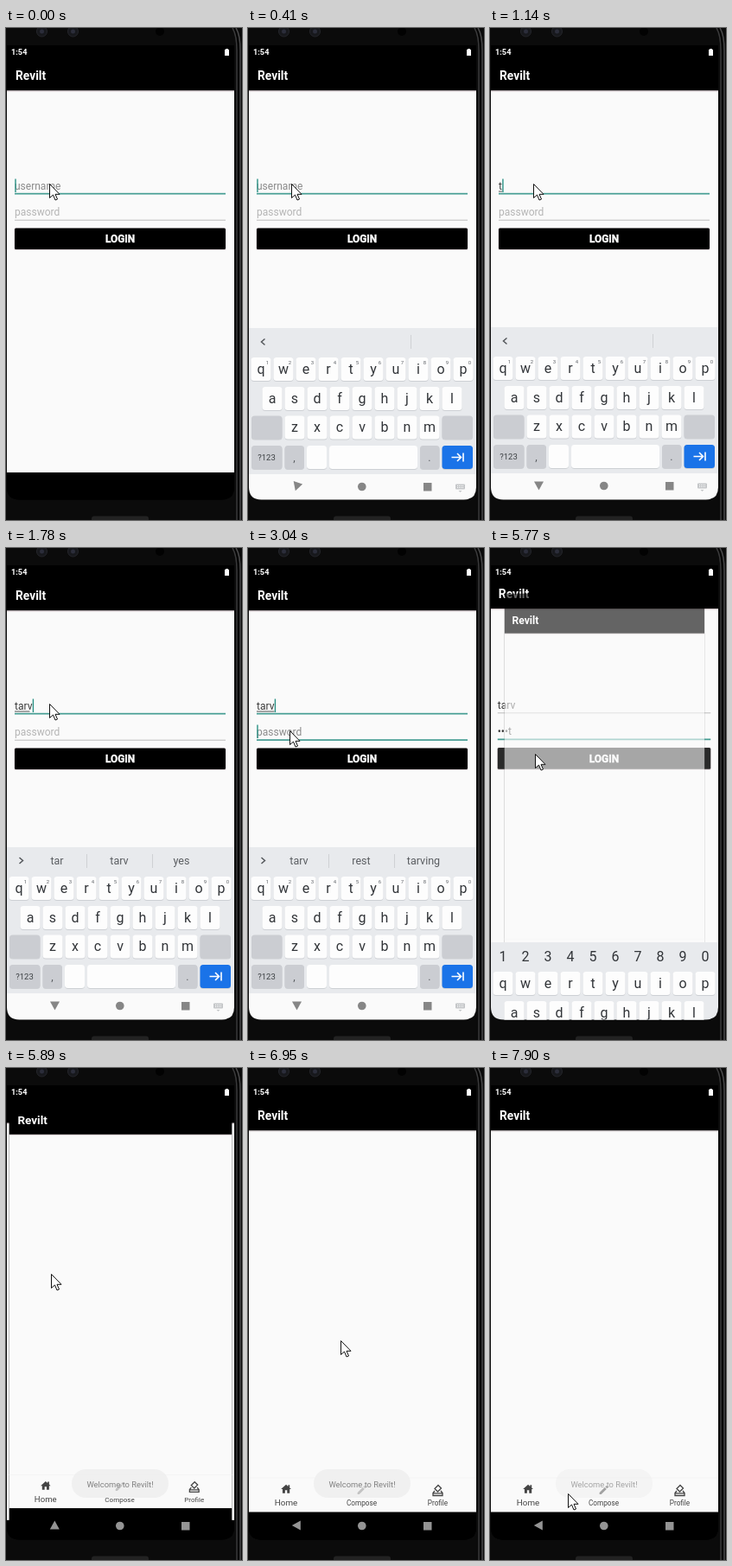
These frames come from a looping animation (273 by 569 pixels, 8 s). An HTML page:

```html
<!DOCTYPE html>
<html lang="en">
<head>
<meta charset="utf-8">
<title>Login demo</title>
<style>
html, body { margin: 0; width: 100%; height: 100%; overflow: hidden; background: #0b0b0b; }
svg { display: block; width: 273px; height: 569px; font-family: Roboto, Arial, sans-serif; }
.mid { text-anchor: middle; }
.bold { font-weight: 700; fill: #fff; }
.field { font-size: 12px; }
.key { font-size: 16px; fill: #323539; }
.small { font-size: 6px; fill: #5f6368; }
.word { font-size: 12.5px; fill: #5a5d61; }
</style>
</head>
<body>
<svg viewBox="0 0 273 569">
  <defs>
    <clipPath id="screen"><path d="M1 20H264V531Q264 545.500 249.500 545.500H15.500Q1 545.500 1 531Z"/></clipPath>
    <g id="softkeys">
      <circle cx="131.800" cy="529.500" r="4.800"/>
      <rect x="203" y="525" width="9.500" height="9.500"/>
    </g>
    <path id="back" d="M-5.500 0L4.500 -5.500V5.500Z"/>
  </defs>

  <!-- phone body -->
  <rect width="273" height="569" fill="#0b0b0b"/>
  <g fill="none">
    <path d="M262 0Q267 8 267 26V569" stroke="#3a3a3b" stroke-width="1.500"/>
    <path d="M264.500 0Q269 8 269 26V569" stroke="#050505" stroke-width="2"/>
    <path d="M266 0Q271 8 271 26V569" stroke="#4a4a4b" stroke-width="1.500"/>
  </g>
  <g fill="#17181c" stroke="#25262b">
    <circle cx="41.500" cy="4" r="6"/><circle cx="77.500" cy="4" r="6"/>
  </g>
  <g fill="#2b2d3a"><circle cx="41.500" cy="4" r="2.500"/><circle cx="77.500" cy="4" r="2.500"/></g>
  <circle cx="178" cy="4" r="5" fill="#020202"/>
  <rect x="99" y="564.500" width="66" height="8" rx="3" fill="#222"/>

  <g clip-path="url(#screen)">
    <rect x="1" y="20" width="263" height="526"/>
    <g id="login">
      <rect x="1" y="20" width="263" height="526"/>
      <rect x="1" y="72.500" width="263" height="441.500" fill="#fafafa"/>
      <rect x="1" y="72.500" width="263" height="1" fill="#d8cacf"/>
      <text class="bold" x="11" y="60" font-size="13.800">Revilt</text>
      <rect id="userLine" x="10" width="244"/>
      <rect id="passLine" x="10" width="244"/>
      <text id="user" class="field" x="10" y="187"></text>
      <rect id="spell" x="10" y="188.500" height="1" fill="#555"/>
      <text id="pass" class="field" x="10" y="217"></text>
      <rect id="userCaret" y="174.500" width="1.400" height="15.500" fill="#2a9184"/>
      <rect id="passCaret" y="204.500" width="1.400" height="15.500" fill="#2a9184"/>
      <rect x="9.500" y="231" width="245" height="26" rx="1.500" fill="#e3dade"/>
      <rect id="button" x="10" y="231.500" width="244" height="24.500" rx="1.500"/>
      <text class="bold mid" x="132" y="248" font-size="11.900" stroke="#fff" stroke-width=".35">LOGIN</text>
    </g>

    <g id="home">
      <rect x="1" y="20" width="263" height="526"/>
      <rect x="1" y="72.500" width="263" height="441" fill="#fafafa"/>
      <rect x="1" y="72.500" width="263" height="1" fill="#d8cfd2"/>
      <rect x="1" y="473.500" width="263" height="1" fill="#f5f5f5"/>
      <text class="bold" x="11" y="60" font-size="13.800">Revilt</text>
      <g fill="#444" class="mid">
        <path transform="translate(37 480) scale(.59)" d="M19 9.300V4h-3v2.600L12 3 2 12h3v8h5v-6h4v6h5v-8h3z"/>
        <path transform="translate(125 481.500) scale(.55)" fill="#555" d="M3 17.250V21h3.750L17.800 9.900l-3.750-3.750zM20.700 7a1 1 0 0 0 0-1.400l-2.300-2.300a1 1 0 0 0-1.400 0l-1.900 1.800 3.750 3.750z"/>
        <g fill="none" stroke="#444" stroke-width="1.300">
          <path d="M220 482.500L223.500 486L219.500 490L216 486.500Z"/>
          <path d="M216 489L214 491.500V494.500H225V491.500L223 489M214 491.800H225"/>
        </g>
        <text x="44" y="506" font-size="9.800">Home</text>
        <text x="131.500" y="506" font-size="8.200">Compose</text>
        <text x="219.500" y="506" font-size="8.200">Profile</text>
      </g>
    </g>
    <g id="homeNav" fill="#949494">
      <use href="#softkeys"/>
      <use id="homeBack" href="#back"/>
    </g>

    <g id="board">
      <rect x="1" y="346" width="263" height="170" fill="#e8eaed"/>
      <rect x="1" y="515" width="263" height="31" fill="#fafafa"/>
      <path id="chevron" fill="none" stroke="#55585c" stroke-width="1.500"/>
      <g id="words"></g>
      <g id="digits"></g>
      <g id="keys"></g>
      <g id="plain"></g>
      <g id="secret"></g>
      <g fill="#868686">
        <use href="#softkeys"/>
        <use id="boardBack" href="#back"/>
      </g>
      <rect x="240" y="526.500" width="11" height="6" rx="1" fill="#c5c7c9"/>
      <path d="M242 528.500H249.500M242 530.500H249.500" stroke="#fff" stroke-dasharray="1 1"/>
      <path d="M243.500 534H247.500L245.500 536Z" fill="#c5c7c9"/>
    </g>

    <g id="toast">
      <rect x="76" y="464" width="112" height="33" rx="16" fill="#eee" fill-opacity=".72"/>
      <text class="mid" x="132" y="484.800" font-size="9.400" fill="#808080">Welcome to Revilt!</text>
    </g>

    <text class="bold" x="6" y="31.300" font-size="9.200">1:54</text>
    <path d="M254 24H257V25H258V32H253V25H254Z" fill="#fff"/>
  </g>

  <path id="mouse" d="M0 0V16L4 12.500L6.500 18.500L9 17.500L6.500 11.800H11.500Z" fill="#fff" stroke="#111" stroke-linejoin="round"/>
</svg>
<script>
const LOOP = 8000, STEP = 134;
const $ = id => document.getElementById(id);
const TEAL = '#459d93';

// Pointer moves: start time, number of steps, end point.
const moves = [[2470, 1, 49, 180], [2760, 2, 48, 211], [4680, 4, 52, 238],
  [6030, 3, 108, 307], [6950, 8, 90, 492]];

// Each track is a list of [start time, ...values]; a value holds until the next one.
const slide = [[0, 200], [140, 120], [270, 24], [410, 1], [560, 0], [5760, 110], [5890, 200]];
const boardTurn = [[0, 0], [270, -40], [410, -72], [560, -90]];
const homeTurn = [[0, 90], [6030, 45], [6170, 12], [6320, 0]];
const userText = [[0, ''], [1140, 't'], [1300, 'ta'], [1620, 'tar'], [1780, 'tarv']];
const passText = [[0, ''], [3760, 't'], [4030, '•e'], [4280, '••s'], [4560, '•••t']];
const userBlink = [[0, 1], [690, 0], [1140, 1], [2340, 0], [2760, 1], [3190, 0]];
const passBlink = [[0, 0], [3040, 1], [3610, 0], [3760, 1], [5080, 0]];
const hints = [[0], [1300, 'to', 'the', 'that'], [1460, 'ta', 'take', 'talk'],
  [1780, 'tar', 'tarv', 'yes'], [2060, 'tarv', 'rest', 'tarving']];
const homeZoom = [[0, 0, 0], [5760, .88, .6], [5890, .98, 1], [6030, .996, 1], [6170, 1, 1]];
const loginZoom = [[0, 1], [5760, 1.01], [5890, 1.04]];
const toastAlpha = [[0, 0], [5890, 1], [7900, .7]];

function at(track, t) {
  let now = track[0];
  for (const step of track) if (step[0] <= t) now = step;
  return now.slice(1);
}

function pointer(t) {
  let x = 50, y = 180;
  for (const [start, steps, toX, toY] of moves) {
    if (t < start) break;
    const p = Math.min(1, (Math.floor((t - start) / STEP) + 1) / steps);
    const ease = p * p * (3 - 2 * p);
    x += (toX - x) * ease;
    y += (toY - y) * ease;
  }
  return [Math.round(x) + .5, Math.round(y) + .5];
}

const set = (id, attrs) => { for (const k in attrs) $(id).setAttribute(k, attrs[k]); };
const show = (id, on) => { $(id).style.display = on ? '' : 'none'; };
const label = (x, y, s, cls) => `<text class="mid ${cls}" x="${x}" y="${y}">${s}</text>`;
const cap = (x, y, w, fill) =>
  `<rect x="${x}" y="${y + 1}" width="${w}" height="27" rx="3.500" fill="#cdd0d4"/>` +
  `<rect x="${x}" y="${y}" width="${w}" height="27" rx="3.500" fill="${fill}"/>`;
const icon = d => `<path d="${d}" fill="none" stroke="#44474b" stroke-width="1.400" stroke-linejoin="round"/>`;

function buildBoard() {
  const GREY = '#cbcdd2', BLUE = '#1a73e8', WHITE = '#fdfdfd', digits = '1234567890';
  let keys = '';
  [['qwertyuiop', 15, 380], ['asdfghjkl', 28, 414], ['zxcvbnm', 54, 447.5]].forEach(([row, x0, y]) => {
    [...row].forEach((c, i) => {
      const x = x0 + 26 * i;
      keys += cap(x - 11.5, y, 23, WHITE) + label(x, y + 18.5, c, 'key');
    });
  });
  keys += cap(4, 447.5, 35.5, GREY) + cap(224.5, 447.5, 35.5, GREY);
  keys += cap(4, 482, 35.5, GREY) + '<text class="mid" x="21.500" y="499" font-size="9.500" fill="#3c4043">?123</text>';
  keys += cap(42.5, 482, 22.5, GREY) + label(53.5, 500, ',', 'word');
  keys += cap(199, 482, 22.5, GREY) + label(210, 500, '.', 'word');
  keys += cap(224.5, 482, 35.5, BLUE);
  $('keys').innerHTML = keys;

  $('plain').innerHTML =
    [...digits].map((d, i) => label(22.5 + 26 * i, 388, d, 'small')).join('') +
    cap(68, 482, 23, WHITE) + cap(94, 482, 102, WHITE) +
    '<path d="M235.500 495.500H246M242 491L246.500 495.500L242 500M249 490.500V500.500" fill="none" stroke="#fff" stroke-width="1.600"/>';

  $('secret').innerHTML =
    cap(68, 482, 128, WHITE) +
    icon('M21.500 455L28 462H24.500V467.500H18.500V462H15Z') +
    icon('M239 456H249V467H239L234 461.500ZM240.500 459L245.500 464M245.500 459L240.500 464') +
    '<path d="M236.500 495.500L240.500 499.500L248 491.500" fill="none" stroke="#fff" stroke-width="1.800"/>';

  $('digits').innerHTML = [...digits].map((d, i) => label(15 + 26 * i, 367.5, d, 'key')).join('');
}

function drawWords(t) {
  const words = at(hints, t);
  const bars = words.length ? [93.5, 169.5] : [188.5];
  $('words').innerHTML = words.map((w, i) => label(59 + 72 * i, 366, w, 'word')).join('') +
    bars.map(x => `<rect x="${x - .5}" y="354" width="1" height="16" fill="#cfd1d4"/>`).join('');
  set('chevron', { d: words.length ? 'M15.500 358L19.500 361.500L15.500 365' : 'M19.500 358.500L15.500 362L19.500 365.500' });
}

function drawField(id, text, hint, focused, caret) {
  $(id).textContent = text || hint;
  set(id, { fill: text ? '#3a3a3a' : focused ? '#8a8a8a' : '#b4b4b4' });
  const width = text ? $(id).getComputedTextLength() : 0;
  set(id + 'Caret', { x: 10.3 + width });
  show(id + 'Caret', caret);
  return width;
}

function drawLine(id, y, focused) {
  set(id, { y: focused ? y : y + .5, height: focused ? 1.7 : 1, fill: focused ? TEAL : '#bdbdbd' });
}

const zoom = s => `translate(132 292) scale(${s}) translate(-132 -292)`;

function draw(t) {
  const inUser = t < 3190, inPass = t >= 3040;
  const width = drawField('user', at(userText, t)[0], 'username', inUser, at(userBlink, t)[0]);
  drawField('pass', at(passText, t)[0], 'password', inPass, at(passBlink, t)[0]);
  drawLine('userLine', 190.8, inUser);
  drawLine('passLine', 221.2, inPass);
  show('spell', inUser);
  set('spell', { width: t >= 1780 && t < 2060 ? width - 3 : width });
  set('button', { fill: t >= 5480 ? '#2a2a2a' : '#000' });
  set('login', { transform: zoom(at(loginZoom, t)[0]) });

  const secret = t >= 3190;
  show('board', t >= 140 && t < 5890);
  set('board', { transform: `translate(0 ${at(slide, t)[0]})` });
  set('boardBack', { transform: `translate(56.500 529) rotate(${at(boardTurn, t)[0]})` });
  ['secret', 'digits'].forEach(id => show(id, secret));
  ['plain', 'words', 'chevron'].forEach(id => show(id, !secret));
  drawWords(t);

  const [scale, alpha] = at(homeZoom, t);
  show('home', alpha > 0);
  show('homeNav', alpha > 0);
  set('home', { transform: zoom(scale), opacity: alpha });
  set('homeBack', { transform: `translate(56.300 529) rotate(${at(homeTurn, t)[0]})` });
  set('toast', { opacity: at(toastAlpha, t)[0] });

  set('mouse', { transform: `translate(${pointer(t)})` });
}

buildBoard();
draw(0);
const start = performance.now();
(function tick() {
  draw((performance.now() - start) % LOOP);
  requestAnimationFrame(tick);
})();
</script>
</body>
</html>
```
